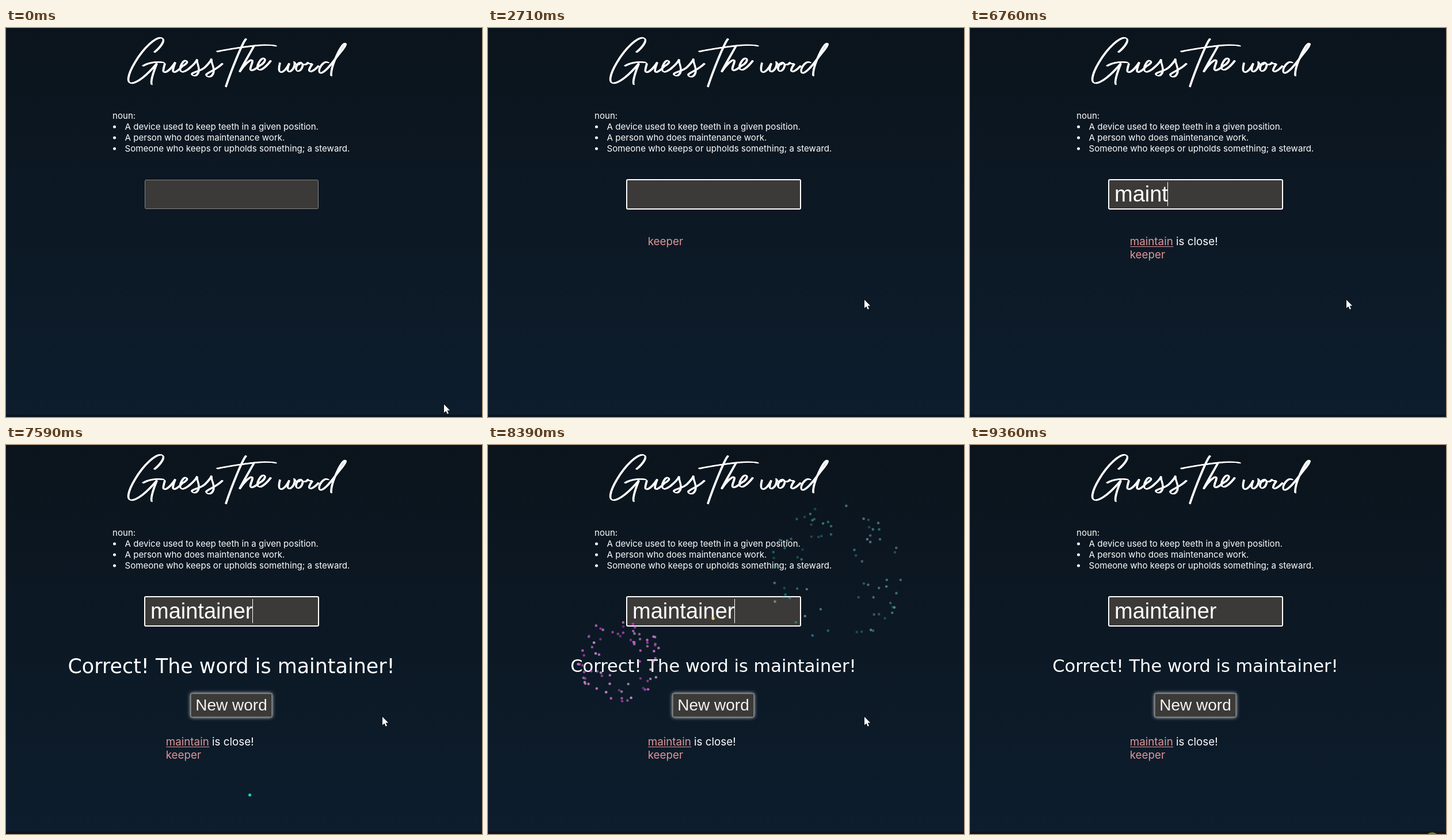
An HTML page with a canvas for the animation above (9.4 s loop, 827 by 677 pixels).

```html
<!DOCTYPE html>
<html lang="en">
<head>
<meta charset="utf-8">
<title>Guess the word</title>
<style>
  html, body { margin: 0; width: 100%; height: 100%; overflow: hidden; background: #0b141c; }
  canvas { display: block; }
</style>
</head>
<body>
<canvas id="stage" width="827" height="677"></canvas>
<script>
const LOOP = 9400, SOLVED = 7510;
const ctx = document.getElementById('stage').getContext('2d');
const PINK = '#e09696', FIELD = '#3b3a38';

// Handwritten title, one path per group of joined letters
const TITLE = [
  'M258 42C268 34 277 22 272 18C262 12 238 36 224 60C212 80 208 97 219 96C232 94 250 76 262 62C258 72 251 92 253 98M238 66C248 60 262 58 274 60',
  'M276 62C274 70 271 78 276 77C282 76 290 66 294 60C291 68 288 77 292 77C297 77 304 69 307 66C313 63 317 59 313 57C308 55 301 68 303 74C305 80 315 74 322 67' +
    'C328 62 331 57 332 55C331 62 338 70 334 78C330 86 322 83 323 80C325 76 338 76 346 68C352 62 356 57 357 54C356 62 364 70 360 79C356 88 347 85 348 81C350 77 364 74 376 62',
  'M417 19C411 25 392 72 382 102M367 41C385 37 425 31 441 30C455 29 463 30 469 31',
  'M431 31C424 44 413 62 406 76C413 65 424 54 428 56C430 60 421 72 426 74C431 74 436 69 440 66C447 63 452 56 449 53C443 51 434 66 438 72C443 76 453 66 460 57',
  'M476 61C474 68 473 77 478 77C484 76 489 68 492 62C489 69 488 76 492 76C498 75 503 66 501 59C503 64 507 65 511 62',
  'M513 60C506 60 501 71 506 75C512 76 519 65 513 60C516 65 521 65 525 60C525 64 532 61 532 63C528 68 524 76 529 76C535 75 539 70 543 66',
  'M560 60C552 56 541 71 545 78C551 81 563 66 572 54C580 43 592 30 590 27C583 26 564 66 565 83'
].map(d => new Path2D(d));

const ARROW = new Path2D('M0 0V14.5L3.4 11.4L5.8 16.8L8 15.8L5.7 10.5H10.3Z');

// [time, field content]
const TYPING = [
  [0, ''], [1270, 'k'], [1440, 'ke'], [1560, 'kee'], [1930, 'keep'], [2050, 'keepe'], [2170, 'keeper'],
  [2550, ''], [3380, 'm'], [3480, 'ma'], [3580, 'mai'], [3720, 'main'], [4460, 'maint'], [4580, 'mainta'],
  [4700, 'maintai'], [4830, 'maintain'], [5120, ''], [5710, 'm'], [6000, 'ma'], [6170, 'mai'], [6300, 'main'],
  [6760, 'maint'], [6860, 'mainta'], [6960, 'maintai'], [7130, 'maintain'], [7230, 'maintaine'], [7340, 'maintainer']
];
const CARET_ON = [[490, 1020], [1270, 2710], [3210, 4250], [4460, 5340], [5710, 7870], [8385, 8900]];
const FOCUS = 450;

// Each rocket rises from the bottom centre and bursts at x, y
const ROCKETS = [
  { start: 7510, burst: 8050, x: 606, y: 224, color: [30, 205, 205] },
  { start: 7750, burst: 8250, x: 229, y: 373, color: [205, 40, 205] },
  { start: 7900, burst: 8570, x: 391, y: 165, color: [240, 215, 110] },
  { start: 8400, burst: 8720, x: 172, y: 240, color: [110, 215, 110] }
];

function random(seed) {
  const n = Math.sin(seed * 127.1 + 11.7) * 43758.5453;
  return n - Math.floor(n);
}

function text(str, x, y, font, color = '#fff', align = 'left') {
  ctx.font = font;
  ctx.fillStyle = color;
  ctx.textAlign = align;
  ctx.fillText(str, x, y);
  return ctx.measureText(str).width;
}

function disc(x, y, r, color) {
  ctx.fillStyle = color;
  ctx.beginPath();
  ctx.arc(x, y, r, 0, 7);
  ctx.fill();
}

function box(x, y, w, h, r, lineWidth, border) {
  ctx.beginPath();
  ctx.roundRect(x, y, w, h, r);
  ctx.fillStyle = FIELD;
  ctx.fill();
  ctx.shadowBlur = 0;
  ctx.lineWidth = lineWidth;
  ctx.strokeStyle = border;
  ctx.stroke();
}

function drawBackground() {
  const sky = ctx.createLinearGradient(0, 0, 0, 673);
  sky.addColorStop(0, '#0b141c');
  sky.addColorStop(1, '#0d1d2d');
  ctx.fillStyle = sky;
  ctx.fillRect(0, 0, 827, 673);
  ctx.fillStyle = '#0b141c';
  ctx.fillRect(0, 673, 827, 4);
}

function drawTitle() {
  ctx.strokeStyle = '#fff';
  ctx.lineCap = ctx.lineJoin = 'round';
  ctx.lineWidth = 1.4;
  // A slanted nib makes the downstrokes thicker
  for (let nib = -1; nib <= 1; nib += 0.5) {
    ctx.save();
    ctx.translate(nib * 1.1, nib * 0.5);
    TITLE.forEach(path => ctx.stroke(path));
    ctx.restore();
  }
}

function drawDefinition() {
  const font = '15.1px Inter, sans-serif';
  text('noun:', 185, 158, font);
  ['A device used to keep teeth in a given position.',
   'A person who does maintenance work.',
   'Someone who keeps or upholds something; a steward.'].forEach((line, i) => {
    disc(188.5, 172 + 19 * i, 2.5, '#fff');
    text(line, 206.5, 177 + 19 * i, font);
  });
}

function drawField(t) {
  if (t < FOCUS) box(241.5, 264.5, 301, 50, 2, 1, '#858585');
  else box(241, 264, 302, 51, 2, 2, '#fff');
  const value = TYPING.filter(([time]) => time <= t).pop()[1];
  const width = text(value, 251, 302, '38px "Liberation Sans", Arial, sans-serif');
  if (CARET_ON.some(([on, off]) => t >= on && t < off)) {
    ctx.fillRect(Math.floor(251 + width), value ? 268 : 269, 1, 42);
  }
}

function drawGuesses(t) {
  const font = '18.8px Inter, sans-serif';
  const x = 277.7;
  let y = t < SOLVED ? 378 : 523;
  if (t >= 5120) {
    const width = text('maintain', x, y, font, PINK);
    ctx.fillRect(x + 0.5, y + 2, width, 1);
    text(' is close!', x + width, y, font);
    y += 23;
  }
  if (t >= 2550) text('keeper', x, y, font, PINK);
}

function drawResult(t) {
  const pop = Math.min(1, (t - 7490) / 200);
  const scale = 1 + 0.144 * Math.sin(Math.PI * pop);
  ctx.save();
  ctx.translate(391.5, 384);
  ctx.scale(scale, scale);
  text('Correct! The word is maintainer!', 0, 11, '30.5px "DejaVu Sans", Verdana, sans-serif', '#fff', 'center');
  ctx.restore();

  ctx.shadowColor = '#fff';
  ctx.shadowBlur = 6;
  box(321, 432.5, 141, 41, 2, 1.5, '#858585');
  text('New word', 391.5, 462, '28px "Liberation Sans", Arial, sans-serif', '#f4f4f4', 'center');
}

function drawBurst({ x, y, color }, age, seed) {
  const alpha = 1 - age / 600;
  if (alpha <= 0) return;
  const spread = 150 * (1 - Math.exp(-0.0048 * age));
  for (let i = 0; i < 75; i++) {
    const key = seed * 500 + i * 3;
    const angle = random(key) * Math.PI * 2;
    const r = spread * (0.3 + 0.7 * Math.sqrt(random(key + 1)));
    const pale = random(key + 2) * 0.8;
    const rgb = color.map(c => c + (225 - c) * pale);
    disc(x + r * Math.cos(angle), y + r * Math.sin(angle), 2.3,
      `rgba(${rgb},${alpha * (0.55 + 0.6 * random(key + 7))})`);
  }
}

function drawFireworks(t) {
  ROCKETS.forEach((rocket, i) => {
    const p = (t - rocket.start) / (rocket.burst - rocket.start);
    if (p >= 1) drawBurst(rocket, t - rocket.burst, i + 1);
    else if (p >= 0) disc(391.5 + (rocket.x - 391.5) * p, 677 + (rocket.y - 677) * p, 2.6, `rgb(${rocket.color})`);
  });
}

function drawPointer(t) {
  const ease = (from, to) => {
    const p = Math.min(1, Math.max(0, (t - from) / (to - from)));
    return p * p * (3 - 2 * p);
  };
  const toField = ease(20, 430), away = ease(490, 810), leave = ease(8850, 9330);
  const x = 761 - 286 * toField + 179 * away + 149 * leave;
  const y = 655 - 355 * toField + 173 * away + 213 * leave;
  if (t >= 9345) disc(x, y, 12, '#7d7a1c');
  ctx.save();
  ctx.translate(x, y);
  ctx.lineWidth = 1;
  if (y < 315) {
    ctx.strokeStyle = '#fff';
    ctx.stroke(new Path2D('M-3 -8H3M0 -8V8M-3 8H3'));
  } else {
    ctx.strokeStyle = '#000';
    ctx.stroke(ARROW);
    ctx.fillStyle = '#fff';
    ctx.fill(ARROW);
  }
  ctx.restore();
}

function draw() {
  const t = performance.now() % LOOP;
  drawBackground();
  drawTitle();
  drawDefinition();
  drawField(t);
  drawGuesses(t);
  if (t >= SOLVED) {
    drawResult(t);
    drawFireworks(t);
  }
  drawPointer(t);
  requestAnimationFrame(draw);
}
draw();
</script>
</body>
</html>
```
